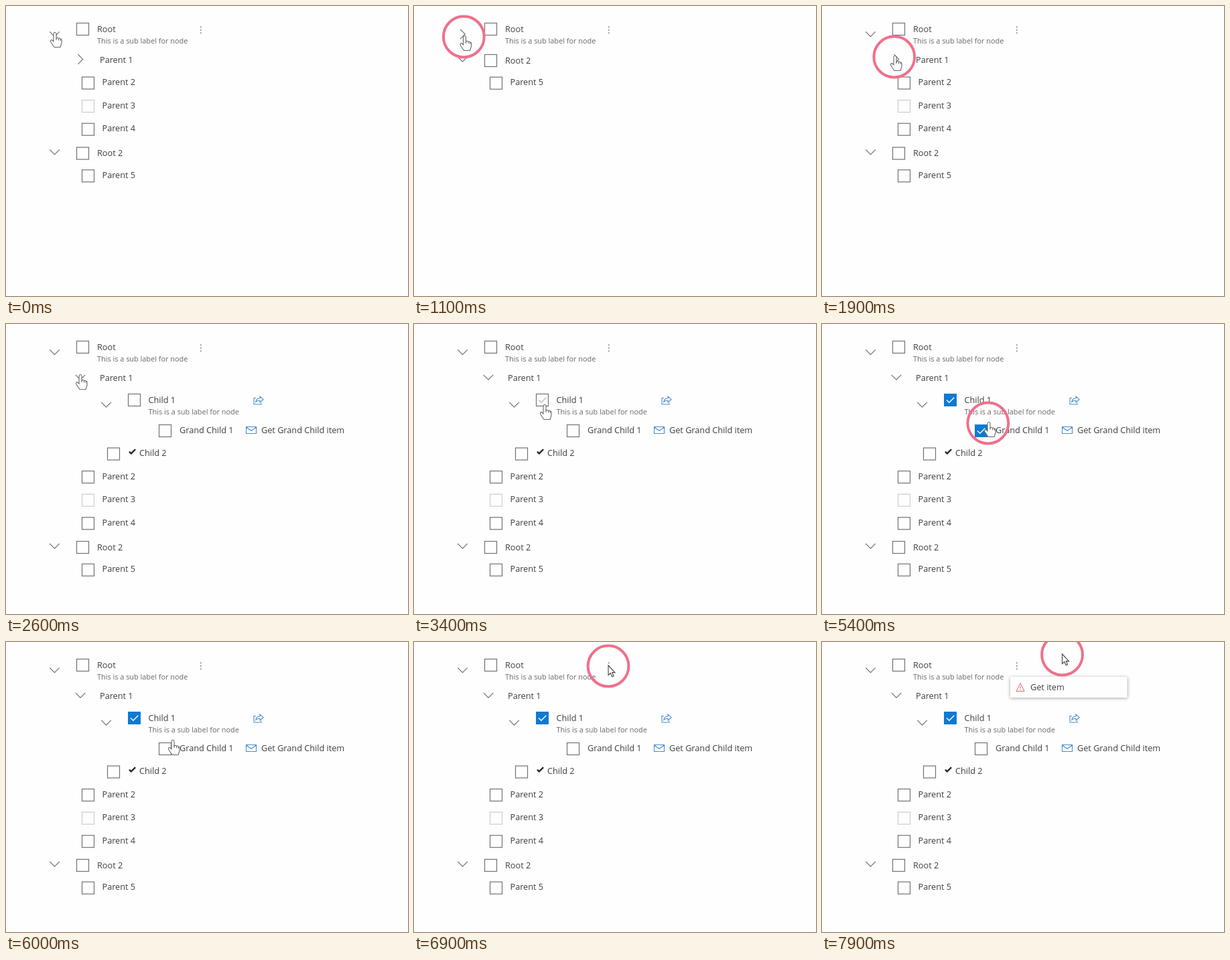
An HTML page with a canvas for the animation above (8 s loop, 600x433 px).

```html
<!DOCTYPE html>
<html lang="en">
<head>
<meta charset="utf-8">
<title>Tree view</title>
<style>
  html, body { margin: 0; width: 100%; height: 100%; overflow: hidden; background: #fefefe; }
  canvas { display: block; }
</style>
</head>
<body>
<canvas id="stage" width="600" height="433"></canvas>
<script>
const ctx = document.getElementById('stage').getContext('2d');
const LOOP = 8000, STEP = 100;
const INK = '#3f3d40', LINE = '#737177', BLUE = '#0f7ad0', ICON = '#4a8bcd';

// Pointer stops: time, x, y of the tip
const STOPS = [
  [0, 73, 39], [400, 75.5, 44], [1400, 75.5, 44], [1800, 109, 74], [2500, 109, 74],
  [2900, 122, 82], [3300, 195, 120], [3900, 195, 120], [4300, 247, 160.5],
  [4900, 247, 160.5], [5200, 249, 146], [6100, 249, 146], [6700, 290, 35],
  [7500, 290, 35], [7700, 358.5, 18], [LOOP, 358.5, 18]
];
const CLICKS = [500, 1100, 1900, 3600, 4400, 5300, 6900, 7900];
const RING_TIME = 350;

const HAND = new Path2D('M-2 2Q0-1.5 2 2V9.5Q4 7 5.5 9.5Q7.5 8 8.3 10.5Q10 9.5 10 12V16.5L8 22.5H-1L-6 15Q-7.5 11.5-4.5 11.5L-2 14Z');
const KNUCKLES = new Path2D('M2 9V12M5.5 9.5V12.5M8.3 10.5V13');
const ARROW = new Path2D('M0 0V14.5L3.3 11.5L5.6 16.8L8 15.8L5.7 10.6H10Z');
const TICK = new Path2D('M-5.5 0L-1.7 3.8L5.8-3.8');
const BOLD_TICK = new Path2D('M-4.5.2L-1.8 2.8L4.6-3.4');
const CHEVRON = new Path2D('M-7.3-3.6L0 3.7L7.3-3.6');
const SHARE = new Path2D('M4 4.5H1V14H12V11.5M3.8 10.5Q4.5 5 10 5V2L15 6.7L10 11V8.3Q6 8 3.8 10.5Z');
const MAIL = new Path2D('M.5.5H15.5V10.5H.5ZM.5 1L8 6.5L15.5 1');
const WARNING = new Path2D('M6.5.5L12.5 12.5H.5ZM6.5 4.5V8.5M6.5 9.8V11');

function stroke(path, x, y, color, width = 1, angle = 0, fill) {
  ctx.save();
  ctx.translate(x, y);
  ctx.rotate(angle);
  if (fill) { ctx.fillStyle = fill; ctx.fill(path); }
  ctx.strokeStyle = color;
  ctx.lineWidth = width;
  ctx.stroke(path);
  ctx.restore();
}

function text(label, x, baseline, size = 12.7, color = INK) {
  ctx.font = `${size}px "Open Sans", "Noto Sans", sans-serif`;
  ctx.fillStyle = color;
  ctx.fillText(label, x, baseline);
}

const subLabel = (x, y) => text('This is a sub label for node', x, y, 10.9, '#69676b');

const chevron = (x, y, open) => stroke(CHEVRON, x, y, LINE, 1.2, open ? 0 : -Math.PI / 2);

function checkbox(x, y, { checked, hover, disabled } = {}) {
  if (checked) {
    ctx.fillStyle = BLUE;
    ctx.fillRect(x - 9.5, y - 9.5, 19, 19);
  } else {
    ctx.strokeStyle = disabled ? '#cfcdd0' : LINE;
    ctx.lineWidth = 1.2;
    ctx.strokeRect(x - 9, y - 9, 18, 18);
  }
  if (checked || hover) stroke(TICK, x, y, checked ? '#fff' : '#bdbbbe', checked ? 1.5 : 1.3);
}

function drawTree(t) {
  const rootOpen = t < 600 || t >= 1300;
  const parentOpen = t >= 2100;
  const shift = parentOpen ? 113.5 : 0;

  chevron(72.5, 42, rootOpen);
  checkbox(114.5, 34.5);
  text('Root', 136, 39);
  subLabel(136, 56.2);
  ctx.fillStyle = '#777';
  for (const y of [30.5, 35, 39.5]) ctx.fillRect(290, y, 1.6, 1.6);

  if (rootOpen) {
    chevron(111, 79.5, parentOpen);
    text('Parent 1', 140, 85);
    if (parentOpen) drawChildren(t);
    for (let i = 0; i < 3; i++) {
      const y = 115 + i * 34.6 + shift;
      checkbox(122.5, y, { disabled: i === 1 });
      text('Parent ' + (i + 2), 143.5, y + 3);
    }
  }

  const y = rootOpen ? 220 + shift : 81.5;
  chevron(72.5, y - 2, true);
  checkbox(114.5, y);
  text('Root 2', 136, y + 4);
  checkbox(122.5, y + 33.7);
  text('Parent 5', 143.5, y + 36.7);
}

function drawChildren(t) {
  chevron(149.5, 120.5, true);
  checkbox(191.5, 113.5, { checked: t >= 3800, hover: t >= 3300 });
  text('Child 1', 212.5, 118);
  subLabel(212.5, 135.2);
  stroke(SHARE, 369, 106, ICON, 1.1);

  checkbox(237.5, 159.5, { checked: t >= 4500 && t < 5500, hover: t >= 4300 && t < 4500 });
  text('Grand Child 1', 259, 163);
  stroke(MAIL, 358, 153, ICON, 1.1);
  text('Get Grand Child item', 381, 163);

  checkbox(160.5, 194);
  stroke(BOLD_TICK, 188.5, 190.5, '#262427', 2.3);
  text('Child 2', 199, 197);
}

function drawMenu() {
  ctx.save();
  ctx.shadowColor = 'rgba(0,0,0,.35)';
  ctx.shadowBlur = 5;
  ctx.shadowOffsetY = 1;
  ctx.fillStyle = '#fefefe';
  ctx.fillRect(281, 52, 174.5, 31);
  ctx.restore();
  stroke(WARNING, 289.5, 61, '#e8676b');
  text('Get item', 311, 72);
}

function pointerAt(t) {
  const i = STOPS.findIndex(stop => stop[0] > t);
  const [t0, x0, y0] = STOPS[i - 1], [t1, x1, y1] = STOPS[i];
  const p = (t - t0) / (t1 - t0), ease = p * p * (3 - 2 * p);
  return [x0 + (x1 - x0) * ease, y0 + (y1 - y0) * ease];
}

function drawPointer(t) {
  const [x, y] = pointerAt(t);
  const isArrow = t >= 6200 || (t >= 2700 && t < 3200);
  if (isArrow) {
    stroke(ARROW, x, y, '#444', 1.1, 0, '#fff');
  } else {
    stroke(HAND, x, y, '#666', 1.1, 0, '#fff');
    stroke(KNUCKLES, x, y, '#666');
  }
  const click = CLICKS.find(c => t >= c && t < c + RING_TIME);
  if (click === undefined) return;
  ctx.globalAlpha = Math.min(1, (RING_TIME - (t - click)) / 200);
  ctx.strokeStyle = '#f0708a';
  ctx.lineWidth = 4;
  ctx.beginPath();
  ctx.arc(x - (isArrow ? 0 : 1.2), y + (isArrow ? 1 : 2), 30.4, 0, 2 * Math.PI);
  ctx.stroke();
  ctx.globalAlpha = 1;
}

const start = performance.now();
function frame() {
  const elapsed = (performance.now() - start) % LOOP;
  const t = Math.floor(elapsed / STEP) * STEP;
  ctx.fillStyle = '#fefefe';
  ctx.fillRect(0, 0, 600, 433);
  drawTree(t);
  if (t >= 7100) drawMenu();
  drawPointer(t);
  requestAnimationFrame(frame);
}
frame();
</script>
</body>
</html>
```
